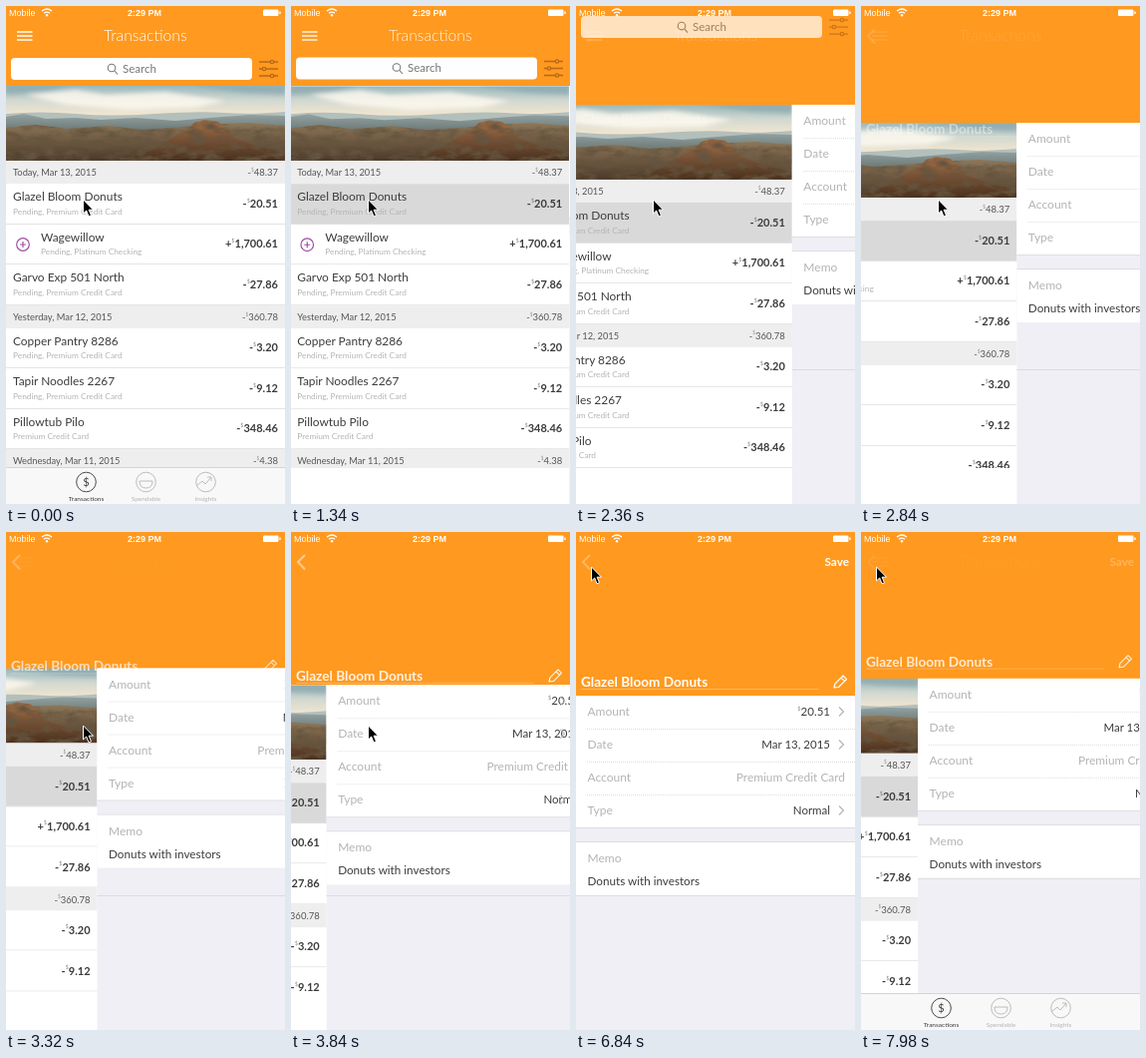
Write an HTML page that moves like this. It is 280 px wide and 499 px high and loops after 8 s.

```html
<!DOCTYPE html>
<html lang="en">
<head>
<meta charset="utf-8">
<title>Transactions</title>
<style>
  html, body { margin: 0; width: 100%; height: 100%; overflow: hidden; background: #fff; }
  #stage {
    --p: 0; --old: 1; --edge: calc(80px + 84px * var(--p));
    position: relative; width: 280px; height: 499px; overflow: hidden;
    background: #fff; color: #3c3c3c; font-family: Lato, "Open Sans", sans-serif;
  }
  #stage div, #stage svg { position: absolute; }
  svg { overflow: visible; fill: none; }
  .t { position: absolute; line-height: 20px; margin-top: -10px; white-space: nowrap; }
  .t sup { font-size: .5em; line-height: 0; vertical-align: .95em; font-weight: 300; }
  .light { font-weight: 300; }
  .bold { font-weight: 700; }
  .pale { color: #b4b4b4; }
  .sys { font-family: "Liberation Sans", Arial, sans-serif; }

  #clip { inset: 0 0 36px; overflow: hidden; }
  #list { left: 0; top: 0; width: 280px; transform: translate(calc(-280px * var(--p)), var(--edge)); }
  #photo { overflow: hidden; left: 0; top: 0; }
  .section { left: 0; width: 280px; height: 23px; background: #eeeeef; color: #555; }
  .row { left: 0; width: 280px; height: 40.5px; box-sizing: border-box; border-bottom: 1px solid #e4e4e4; background: #fff; }
  .row.on { background: #d9d9d9; }

  #detail { left: 0; top: 0; width: 280px; height: 499px; background: #f0eff5;
    transform: translate(calc(280px * (1 - var(--p))), var(--edge)); }
  .card { left: 0; width: 280px; background: #fff; }
  #fields { top: 0; height: 132px; border-bottom: 1px solid #dcdce0; }
  #memo { top: 147px; height: 53px; border-top: 1px solid #dcdce0; margin-top: -1px; }
  #foot { left: 0; top: 200px; width: 280px; height: 1px; background: #dcdce0; transform: translateY(var(--drop)); }
  .rule { left: 11px; right: 0; border-top: 1px dotted #dedede; }
  .go { left: 0; top: 0; opacity: var(--p); transform: translateX(var(--lag)); }

  #header { left: 0; top: 0; width: 280px; height: var(--edge); background: #ff991f; }
  #search { left: 0; top: 0; opacity: calc(1 - 1.3 * var(--p)); transform: translateY(calc(-186px * var(--p))); }
  #field { left: 5px; top: 52px; width: 242px; height: 22px; border-radius: 4px; background: #fff; }
  #search .t { color: #777; }
  #home { opacity: var(--old); color: #fff; }
  #back { left: 0; top: 0; opacity: var(--back); }
  #save { left: 0; top: 0; width: 280px; opacity: var(--save); color: #fff; }
  #name { left: 0; top: 0; color: #fff; opacity: var(--p); transform: translateY(var(--nameY)); }
  #status { color: #fff; }
  #tabs { left: 0; top: 463px; width: 280px; height: 36px; background: #f8f8f8; box-shadow: 0 -1px #d4d4d4; }
  #tabs .t { width: 60px; text-align: center; }
  #cursor { left: 0; top: 0; }
</style>
</head>
<body>
<div id="stage">
  <div id="header"></div>
  <div id="home">
    <svg width="280" height="50" stroke="#fff" stroke-width="1.5"><path d="M11 26h15.500M11 30h15.500M11 34h15.500"/></svg>
  </div>
  <div id="search">
    <div id="field"></div>
    <svg width="280" height="80">
      <g stroke="#777" stroke-width="1.100"><circle cx="106" cy="62" r="3.800"/><path d="M109 65l3 3.500"/></g>
      <g stroke="#b5691a" stroke-width="1.300" fill="#ff991f">
        <path d="M254 56h19M254 63h19M254 70h19"/>
        <circle cx="267" cy="56" r="1.700"/><circle cx="259" cy="63" r="1.700"/><circle cx="267" cy="70" r="1.700"/>
      </g>
    </svg>
  </div>
  <div id="clip">
    <div id="list">
      <svg id="photo" width="280" height="75" viewBox="0 0 280 75">
        <defs>
          <linearGradient id="sky" x2="0" y2="1">
            <stop stop-color="#9ab8bd"/><stop offset=".2" stop-color="#d3d9d0"/><stop offset=".4" stop-color="#f3e6cf"/>
          </linearGradient>
          <linearGradient id="haze" x2="0" y2="1">
            <stop stop-color="#93a3a3"/><stop offset=".6" stop-color="#66736f"/>
          </linearGradient>
          <linearGradient id="hill" x2="0" y2="1">
            <stop stop-color="#8d7759"/><stop offset="1" stop-color="#4b3929"/>
          </linearGradient>
          <linearGradient id="rock" x2="0" y2="1">
            <stop stop-color="#a27048"/><stop offset="1" stop-color="#49301f"/>
          </linearGradient>
          <filter id="soft"><feGaussianBlur stdDeviation="2"/></filter>
          <filter id="grain" x="0" y="0" width="1" height="1">
            <feTurbulence type="fractalNoise" baseFrequency=".06 .14" numOctaves="4" seed="4"/>
            <feColorMatrix values="0 0 0 0 .13  0 0 0 0 .09  0 0 0 0 .05  2.6 0 0 0 -1"/>
            <feComposite in2="SourceAlpha" operator="in" result="dark"/>
            <feMerge><feMergeNode in="SourceGraphic"/><feMergeNode in="dark"/></feMerge>
          </filter>
        </defs>
        <path fill="url(#sky)" d="M0 0h280v75H0z"/>
        <g filter="url(#soft)">
          <path fill="#fffaf0" opacity=".8" d="M20 9l50-5 30 5 60-3 60 9-30 7-70 2-60-5z"/>
          <path fill="#7f9ca3" opacity=".5" d="M0 0h70l-30 6-40 3zM185 0h95v9l-40-2z"/>
        </g>
        <path fill="#b3bfbb" d="M0 28q35-3 70 0t80 0 70-1 60-1v20H0z"/>
        <path fill="url(#haze)" d="M0 31l18-3 22 5 30-1 25 2 35-2 40 3 35-3 40-3 35 1v30H0z"/>
        <g filter="url(#grain)">
          <path fill="url(#hill)" d="M0 42l30-3 32 4 40-3 35 4 30-2 35-3 40-2 38 3v35H0z"/>
          <path fill="url(#rock)" d="M120 75l32-13 16-11 13-6 8-8 10-3 14 2 9 8 6 8 22 8 30 7v8z"/>
        </g>
      </svg>
    </div>
  </div>
  <div id="detail">
    <div class="card" id="fields"></div>
    <div class="card" id="memo"></div>
    <div id="foot"></div>
  </div>
  <div id="name">
    <svg width="280" height="20" stroke="#fff">
      <path d="M5 7.500h239" opacity=".3"/>
      <path stroke-width="1.200" stroke-linejoin="round" d="M259 6l1-4 8-8 3.500 3.500-8 8zM266-4l3.500 3.500"/>
    </svg>
  </div>
  <svg id="back" width="30" height="50" stroke="#fff" stroke-width="2"><path d="M14 23l-7 7 7 7.500"/></svg>
  <div id="save"></div>
  <div id="status">
    <svg width="280" height="14">
      <g stroke="#fff" stroke-width="1.300"><path d="M36 5q5-4 10 0M38 7.200q3-2.200 6 0"/></g>
      <circle cx="41" cy="9.200" r="1.200" fill="#fff"/>
      <rect x="258" y="3.500" width="15.500" height="6.500" rx="1.200" fill="#fff"/><path fill="#fff" d="M274.300 5.500h1.400v2.500h-1.400z"/>
    </svg>
  </div>
  <div id="tabs">
    <svg width="280" height="36" stroke="#bdbdbd" stroke-width="1">
      <circle cx="80.500" cy="14" r="9.800" stroke="#4a4a4a"/>
      <circle cx="140.500" cy="14" r="9.800"/><path d="M134 13h13q0 7-6.500 7t-6.500-7z"/>
      <circle cx="200.500" cy="14" r="9.800"/><path d="M191 18l6-5 3 3 6-7M202 9h4v4"/>
    </svg>
  </div>
  <svg id="cursor" width="12" height="18"><path fill="#000" stroke="#fff" stroke-width="1" d="M.5 0v14l3.200-3 2.300 5.800 2.500-1-2.400-5.600h4.400z"/></svg>
</div>
<script>
const $ = id => document.getElementById(id);
const stage = $('stage');
const add = (id, html) => $(id).insertAdjacentHTML('beforeend', html);

// A negative x measures from the right edge.
const text = (s, x, y, size, cls = '') =>
  `<span class="t ${cls}" style="${x < 0 ? 'right' : 'left'}:${Math.abs(x)}px;top:${y}px;font-size:${size}px">${s}</span>`;
const money = s => s[0] + '<sup>$</sup>' + s.slice(1);

const card = 'Pending, Premium Credit Card';
const days = [
  ['Today, Mar 13, 2015', '-48.37', [
    ['Glazel Bloom Donuts', card, '-20.51'],
    ['Wagewillow', 'Pending, Platinum Checking', '+1,700.61'],
    ['Garvo Exp 501 North', card, '-27.86']]],
  ['Yesterday, Mar 12, 2015', '-360.78', [
    ['Copper Pantry 8286', card, '-3.20'],
    ['Tapir Noodles 2267', card, '-9.12'],
    ['Pillowtub Pilo', 'Premium Credit Card', '-348.46']]],
  ['Wednesday, Mar 11, 2015', '-4.38', []]
];
const title = days[0][2][0][0];

let y = 75;
for (const [day, total, rows] of days) {
  add('list', `<div class="section" style="top:${y}px">${text(day, 7, 12, 9.3)}${text(money(total), -7, 12, 9.5)}</div>`);
  y += 23;
  for (const [name, note, sum] of rows) {
    const income = sum[0] === '+', x = income ? 35 : 7;
    const plus = income ? '<svg width="30" height="40" stroke="#a04fa5" stroke-width="1.2"><circle cx="17" cy="20" r="6.300"/><path d="M14 20h6M17 17v6"/></svg>' : '';
    add('list', `<div class="row" style="top:${y}px">${plus}${text(name, x, 13, 11.9)}${
      text(note, x, 27.5, 8.3, 'pale')}${text(money(sum), -7, 19.5, 11, 'bold')}</div>`);
    y += 40.5;
  }
}
const pressedRow = document.querySelector('.row');

const fields = [['Amount', '<sup>$</sup>20.51'], ['Date', 'Mar 13, 2015'], ['Account', 'Premium Credit Card'], ['Type', 'Normal']];
fields.forEach(([label, value], i) => {
  const mid = 16 + 33 * i, fixed = label === 'Account';
  add('detail', text(label, 11.5, mid, 12, 'pale') + text(value, fixed ? -10 : -25, mid, fixed ? 11.9 : 11.5, fixed ? 'pale' : ''));
  if (i) add('detail', `<div class="rule" style="top:${33 * i}px"></div>`);
  if (!fixed) add('detail', `<svg class="go" width="280" height="130" stroke="#b5b5b5" stroke-width="1.2"><path d="M264 ${mid - 4.5}l4.500 4.500-4.500 4.500"/></svg>`);
});
add('detail', text('Memo', 11.5, 163, 12, 'pale') + text('Donuts with investors', 11.5, 185, 11.7));

add('home', text('Transactions', 98, 29, 15.7, 'light'));
add('search', text('Search', 117, 63, 11.5));
add('name', text(title, 5, 0, 13.6, 'bold'));
add('save', text('Save', -6, 30, 11.8, 'bold'));
add('status', text('Mobile', 3, 7, 9, 'sys') + text('2:29 PM', 122, 7, 9, 'sys bold'));
add('tabs', text('$', 50.5, 14, 11));
['Transactions', 'Spendable', 'Insights'].forEach((s, i) =>
  add('tabs', text(s, 50.5 + 60 * i, 31, 6.5, i ? 'pale' : '')));

const LOOP = 8000, SLIDE = 3500, PRESS = 1140, PUSH = 1210, SAVE = 4720, BACK = 6840, POP = 6886;
const clamp = v => Math.min(1, Math.max(0, v));

// cubic-bezier(.42, 0, .58, 1)
function ease(x) {
  let lo = 0, hi = 1, s = .5;
  for (let i = 0; i < 24; i++) {
    s = (lo + hi) / 2;
    const bx = 1.26 * s * (1 - s) ** 2 + 1.74 * s * s * (1 - s) + s ** 3;
    if (bx < x) lo = s; else hi = s;
  }
  return s * s * (3 - 2 * s);
}

const fadeOut = u => (1 - u) ** 3.5;
const fadeIn = u => u ** 2.5;

function draw(t) {
  const push = clamp((t - PUSH) / SLIDE), pop = clamp((t - POP) / SLIDE);
  const popping = t >= POP;
  const p = popping ? 1 - ease(pop) : push > 0 && push < 1 ? ease(push) : push;
  const vars = {
    p,
    old: popping ? fadeIn(pop) : fadeOut(push),
    back: t >= BACK ? .3 * fadeOut(pop) : fadeIn(push),
    save: t >= SAVE ? fadeOut(pop) : 0,
    nameY: (popping ? 50 + 100 * p : 102 + 48 * p) + 'px',
    lag: (popping ? 0 : -232 * (1 - p)) + 'px',
    drop: (popping ? 0 : 84 * (1 - p)) + 'px'
  };
  for (const k in vars) stage.style.setProperty('--' + k, vars[k]);
  pressedRow.classList.toggle('on', t >= PRESS);
  $('tabs').style.visibility = t < PUSH || popping ? 'visible' : 'hidden';
  const c = ease(clamp((t - 5200) / 500));
  $('cursor').style.transform = `translate(${77 - 62 * c}px, ${194 - 159 * c}px)`;
}

const start = performance.now();
function tick() {
  draw((performance.now() - start) % LOOP);
  requestAnimationFrame(tick);
}
tick();
</script>
</body>
</html>
```
